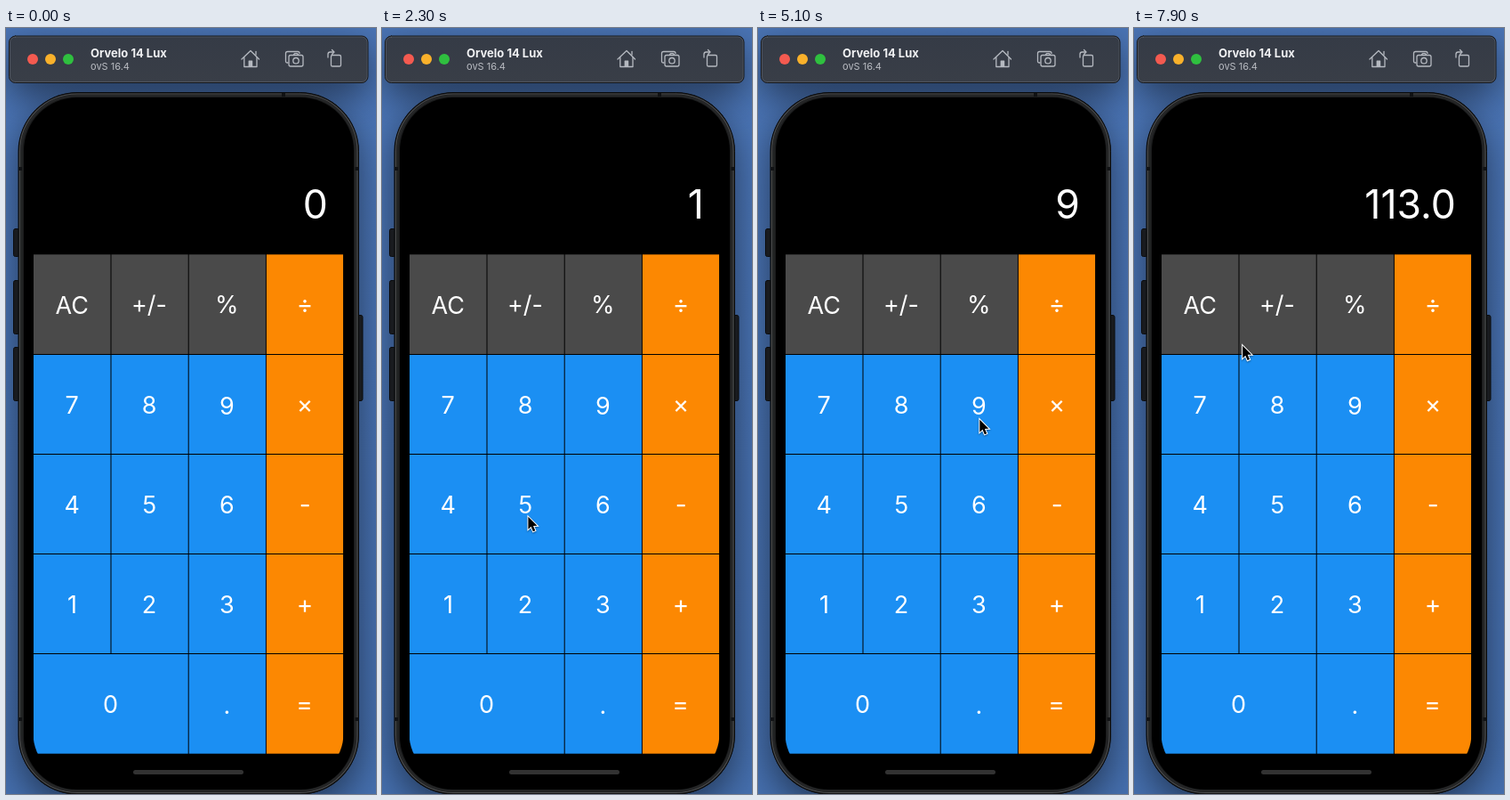
An HTML page with a canvas that plays this animation: 416 px wide and 860 px high, repeating every 8 s.

```html
<!DOCTYPE html>
<html lang="en">
<head>
<meta charset="utf-8">
<title>Calculator</title>
<style>
html, body { margin: 0; width: 100%; height: 100%; overflow: hidden; background: #426aa7; }
canvas { display: block; width: 416px; height: 860px; }
</style>
</head>
<body>
<canvas id="stage"></canvas>
<script>
const W = 416, H = 860, LOOP = 8000, STEP = 100;
const canvas = document.getElementById('stage');
const ctx = canvas.getContext('2d');
const dpr = window.devicePixelRatio || 1;
canvas.width = W * dpr;
canvas.height = H * dpr;

const FONT = 'Inter, Roboto, sans-serif';
const GREY = '#4a4a4a', BLUE = '#1b8ff3', ORANGE = '#fc8802';
const COLS = [30.5, 118, 205.2, 292.4, 379.6];
const ROWS = [253.8, 366.5, 478.5, 590.5, 702.5, 815.2];
const INSET = 0.5;

// rows of keys; null widens the key before it
const KEYS = [
  ['AC', '+/-', '%', '÷'],
  ['7', '8', '9', '×'],
  ['4', '5', '6', '-'],
  ['1', '2', '3', '+'],
  ['0', null, '.', '=']
];

// key, release time, display after it
const PRESSES = [
  ['1', 1500, '1'],
  ['5', 2600, '15'],
  ['+', 3900, '15'],
  ['9', 4900, '9'],
  ['8', 5600, '98'],
  ['=', 6700, '113.0']
];

// time, x, y of the pointer tip
const PATH = [
  [1000, 110, 866], [1300, 77, 665], [1800, 77, 665],
  [2350, 166, 545], [2900, 166, 545],
  [3700, 344, 649], [4050, 344, 649],
  [4800, 275, 438], [5000, 275, 438],
  [5300, 174, 441], [5450, 174, 441],
  [6400, 347, 772], [7150, 347, 772],
  [8043, 105, 325]
];

const clamp = v => Math.max(0, Math.min(1, v));
const smooth = u => u * u * (3 - 2 * u);

function roundBox(x, y, w, h, r, fill, stroke, lw = 1) {
  ctx.beginPath();
  ctx.roundRect(x, y, w, h, r);
  if (fill) { ctx.fillStyle = fill; ctx.fill(); }
  if (stroke) { ctx.strokeStyle = stroke; ctx.lineWidth = lw; ctx.stroke(); }
}

function fade(y0, y1, a, b) {
  const g = ctx.createLinearGradient(0, y0, 0, y1);
  g.addColorStop(0, a);
  g.addColorStop(1, b);
  return g;
}

function text(str, x, y, size, weight, color, align = 'left') {
  ctx.font = `${weight} ${size}px ${FONT}`;
  ctx.textAlign = align;
  ctx.fillStyle = color;
  ctx.fillText(str, x, y);
}

// centres the visible ink of a label on a point
function label(str, x, y, size) {
  ctx.font = `400 ${size}px ${FONT}`;
  ctx.textAlign = 'left';
  const m = ctx.measureText(str);
  ctx.fillText(str,
    x - (m.actualBoundingBoxRight - m.actualBoundingBoxLeft) / 2,
    y + (m.actualBoundingBoxAscent - m.actualBoundingBoxDescent) / 2);
}

function shadowed(color, blur, dy, draw) {
  ctx.save();
  ctx.shadowColor = color;
  ctx.shadowBlur = blur * dpr;
  ctx.shadowOffsetY = dy * dpr;
  draw();
  ctx.restore();
}

function line(points, close) {
  ctx.beginPath();
  points.forEach(([x, y]) => ctx.lineTo(x, y));
  if (close) ctx.closePath();
  ctx.stroke();
}

function drawIcons() {
  const c = '#b5b9c0';
  ctx.strokeStyle = c;
  ctx.lineWidth = 1.3;
  ctx.lineJoin = ctx.lineCap = 'round';
  // home
  line([[265, 35], [275, 25.5], [284.5, 35]]);
  line([[267.8, 33], [267.8, 43.5], [282, 43.5], [282, 33]]);
  line([[281, 30], [281, 26.5]]);
  roundBox(272.6, 36.5, 4.6, 7, 0.5, c);
  // cameras
  ctx.beginPath();
  ctx.moveTo(317, 39);
  ctx.lineTo(316, 39);
  ctx.quadraticCurveTo(314.5, 39, 314.5, 37.5);
  ctx.lineTo(314.5, 28.5);
  ctx.quadraticCurveTo(314.5, 26.5, 316.5, 26.5);
  ctx.lineTo(328, 26.5);
  ctx.quadraticCurveTo(330, 26.5, 330, 28.5);
  ctx.stroke();
  roundBox(318, 30.5, 16, 12.5, 2, null, c, 1.3);
  ctx.beginPath();
  ctx.arc(326, 36.7, 3.2, 0, 7);
  ctx.stroke();
  line([[323.5, 30], [324.5, 28.7], [327.5, 28.7], [328.5, 30]]);
  // rotate
  roundBox(365.5, 30.5, 11, 12.5, 1.6, null, c, 1.3);
  ctx.beginPath();
  ctx.moveTo(362, 33);
  ctx.lineTo(362, 29.5);
  ctx.quadraticCurveTo(362, 27, 364.5, 27);
  ctx.lineTo(368.5, 27);
  ctx.stroke();
  line([[366.5, 24.5], [369, 27], [366.5, 29.5]]);
}

function drawToolbar() {
  roundBox(3.5, 9, 403.5, 52.5, 7, fade(9, 62, '#353b46', '#393e47'), '#15181d');
  roundBox(4.5, 10, 401.5, 50.5, 6, null, 'rgba(255,255,255,.12)');
  ['#f45a50', '#f9b12b', '#2fc03f'].forEach((color, i) => {
    ctx.beginPath();
    ctx.arc(30 + 20 * i, 35, 6, 0, 7);
    ctx.fillStyle = color;
    ctx.fill();
  });
  text('Orvelo 14 Lux', 95, 33, 13, 700, '#f1f2f4');
  text('ovS 16.4', 95, 47, 11, 400, '#b9bcc2');
  drawIcons();
}

function drawShadows() {
  shadowed('rgba(0,0,0,.5)', 40, 14, () => {
    roundBox(14, 72.5, 382.5, 788, 66, '#111');
    roundBox(3.5, 9, 403.5, 52.5, 7, '#363c47');
  });
}

function drawPhone() {
  const side = (x, y, h) => roundBox(x, y, 7, h, 2, '#191b1f', '#0b0c0e');
  [[225.5, 31], [283.5, 60], [358.5, 60]].forEach(([y, h]) => side(8.5, y, h));
  side(394, 322.5, 96);
  roundBox(14, 72.5, 382.5, 787.5, 66, '#1b1c1d', '#090a0b');
  roundBox(15.5, 74, 379.5, 784.5, 64.5, null, '#4a4b4c', 1.2);
  roundBox(17.5, 76, 375.5, 780.5, 62.5, null, '#252627', 2);
  // antenna bands
  ctx.fillStyle = '#111214';
  [158, 776].forEach(y => {
    ctx.fillRect(14, y - 2, 4, 4);
    ctx.fillRect(392.5, y - 2, 4, 4);
  });
  ctx.fillRect(310, 73, 4, 4);
  roundBox(20, 78, 371, 777, 60, '#000');
  roundBox(143, 833, 124, 5, 2.5, '#323232');
}

function keyAlpha(key, t) {
  const press = PRESSES.find(p => p[0] === key);
  if (!press) return 1;
  const up = press[1];
  const depth = t <= up ? clamp((t - up + 200) / 100) : clamp(1 - (t - up) / 200);
  return 1 - 0.82 * depth;
}

function drawKeys(t) {
  ctx.save();
  ctx.beginPath();
  ctx.roundRect(30.5, 200, 349, 645, [0, 0, 53, 53]);
  ctx.clip();
  KEYS.forEach((row, r) => row.forEach((key, c) => {
    if (!key) return;
    const end = row[c + 1] === null ? c + 2 : c + 1;
    const x = COLS[c], w = COLS[end] - x;
    const y = ROWS[r], h = ROWS[r + 1] - y;
    ctx.fillStyle = c === 3 ? ORANGE : r === 0 ? GREY : BLUE;
    ctx.fillRect(x + INSET, y + INSET, w - 2 * INSET, h - 2 * INSET);
    ctx.globalAlpha = keyAlpha(key, t);
    ctx.fillStyle = '#fff';
    const drop = c === 3 ? 2 : key === '.' ? 9.5 : 0.5;
    label(key, x + w / 2 - 0.3, y + h / 2 + drop, c === 3 ? 28 : 27);
    ctx.globalAlpha = 1;
  }));
  ctx.restore();
}

function drawDisplay(t) {
  let value = '0';
  for (const [, up, shown] of PRESSES) if (t >= up) value = shown;
  text(value, 361.8, 214, 44.5, 400, '#fff', 'right');
}

function drawPointer(t) {
  if (t < PATH[0][0]) return;
  const i = PATH.findIndex(p => p[0] > t);
  const [t0, x0, y0] = PATH[i - 1], [t1, x1, y1] = PATH[i];
  const s = smooth((t - t0) / (t1 - t0));
  ctx.save();
  ctx.translate(x0 + (x1 - x0) * s, y0 + (y1 - y0) * s);
  ctx.lineJoin = 'miter';
  ctx.lineWidth = 2;
  ctx.strokeStyle = '#fff';
  ctx.fillStyle = '#000';
  const arrow = [[0.5, 1], [0.5, 15], [3.7, 12], [6, 17.4], [8.4, 16.4], [6.1, 11.1], [10.5, 11]];
  shadowed('rgba(0,0,0,.4)', 2, 1, () => line(arrow, true));
  ctx.fill();
  ctx.restore();
}

function draw(t) {
  ctx.setTransform(dpr, 0, 0, dpr, 0, 0);
  ctx.textBaseline = 'alphabetic';
  ctx.fillStyle = fade(0, H, '#4a74b5', '#456fae');
  ctx.fillRect(0, 0, W, H);
  drawShadows();
  drawPhone();
  drawToolbar();
  drawDisplay(t);
  drawKeys(t);
  drawPointer(t);
}

const start = performance.now();
function tick() {
  const t = (performance.now() - start) % LOOP;
  draw(Math.floor(t / STEP) * STEP);
  requestAnimationFrame(tick);
}
tick();
</script>
</body>
</html>
```
